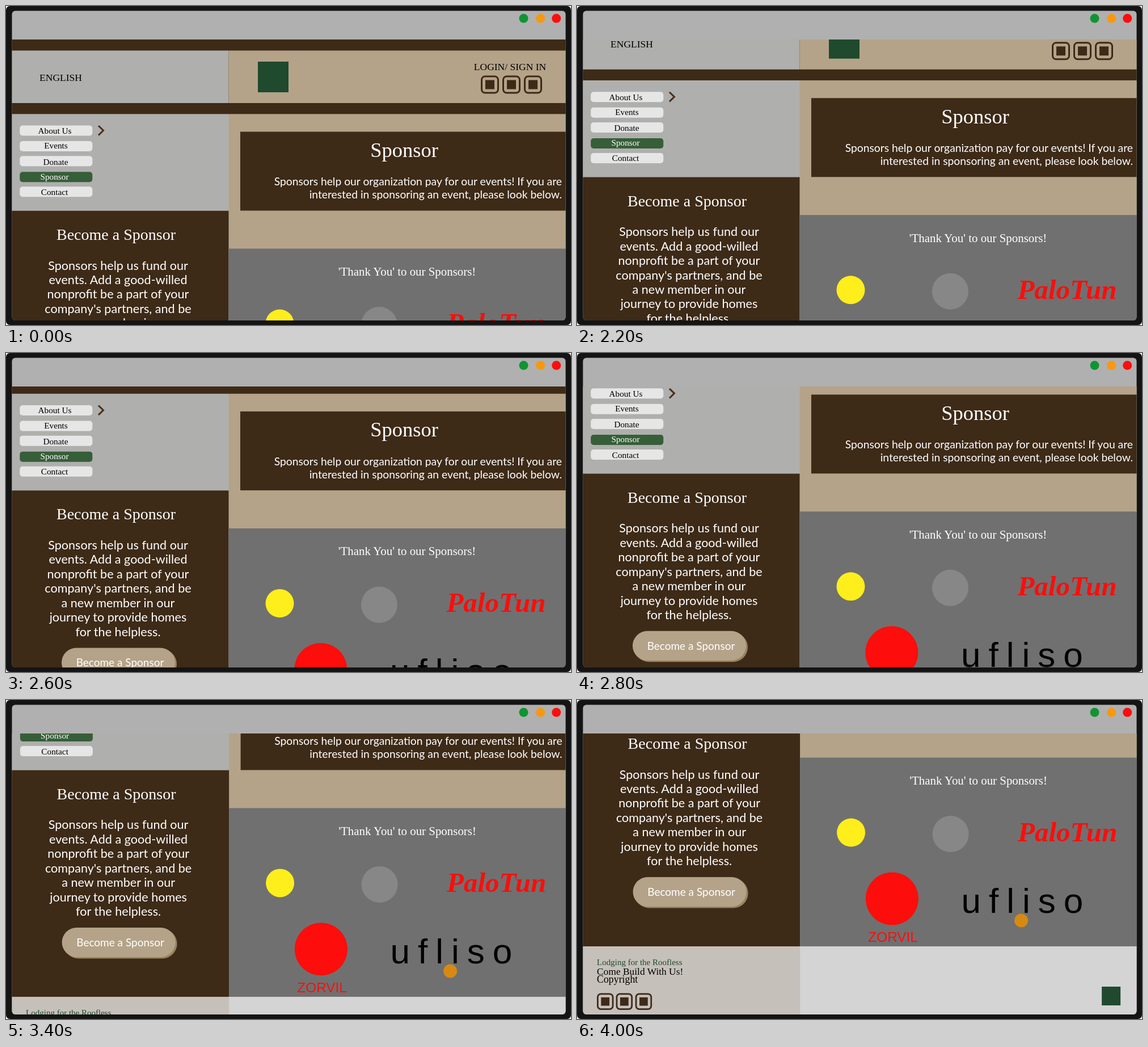
An HTML page that plays this animation: 996x562 px, repeating every 6 s.

```html
<!DOCTYPE html>
<html lang="en">
<head>
<meta charset="utf-8">
<title>Sponsor page</title>
<style>
  html, body { margin: 0; width: 100%; height: 100%; overflow: hidden; background: #fff; }
  svg { display: block; width: 996px; height: 562px; }
  text { font-family: "Liberation Serif", serif; }
  .body { font-family: Lato, sans-serif; fill: #fff; }
  .sans { font-family: "Liberation Sans", sans-serif; }
  .mid { text-anchor: middle; }
  .end { text-anchor: end; }
  .white { fill: #fff; }
  .brown { fill: #3d2a17; }
  .tan { fill: #b4a389; }
  .grey { fill: #afafad; }
  .green { fill: #1f4a2e; }
  .red { fill: #fd0d0b; }
</style>
</head>
<body>
<svg viewBox="0 0 996 562">
  <defs>
    <clipPath id="screen"><rect x="10.5" y="8.5" width="976" height="545.5" rx="6"/></clipPath>
    <clipPath id="view"><rect y="59" width="996" height="503"/></clipPath>
    <g id="social">
      <rect x="1.5" y="1.5" width="29" height="29" rx="6" fill="none" stroke="#3d2a17" stroke-width="3"/>
      <rect x="8" y="8" width="16" height="16" class="brown"/>
    </g>
  </defs>

  <rect width="996" height="562" rx="7" fill="#141414"/>
  <g clip-path="url(#screen)">
    <rect width="996" height="562" fill="#b0b0b0"/>
    <g clip-path="url(#view)">
      <g id="page">
        <!-- header -->
        <rect y="59" width="996" height="132" class="brown"/>
        <rect y="78.5" width="392.5" height="92.5" class="grey"/>
        <rect x="392.5" y="78.5" width="604" height="92.5" class="tan"/>
        <text x="96.5" y="131.8" font-size="17.5" class="mid">ENGLISH</text>
        <rect x="444" y="98" width="54" height="54" class="green"/>
        <text x="888.5" y="113.3" font-size="17.5" class="mid">LOGIN/ SIGN IN</text>
        <use href="#social" x="837" y="122.5"/>
        <use href="#social" x="875" y="122.5"/>
        <use href="#social" x="913" y="122.5"/>

        <!-- menu -->
        <rect y="190.3" width="392.5" height="171" class="grey"/>
        <g id="menu" font-size="15.3" class="mid"></g>
        <path d="M163 211l8.5 8.3-8.5 8.4" fill="none" stroke="#4a2d1a" stroke-width="3"/>

        <!-- intro -->
        <rect x="392.5" y="190.3" width="604" height="238" class="tan"/>
        <rect x="413" y="221.5" width="584" height="139" class="brown"/>
        <text x="702" y="266" font-size="36.5" class="mid white">Sponsor</text>
        <g font-size="19.3">
          <text x="980" y="316.3" class="body end">Sponsors help our organization pay for our events! If you are</text>
          <text x="980" y="339.3" class="body end">interested in sponsoring an event, please look below.</text>
        </g>

        <!-- call to action -->
        <rect y="360.8" width="392.5" height="400" class="brown"/>
        <text x="194" y="412" font-size="28" class="mid white">Become a Sponsor</text>
        <g id="pitch" font-size="21.6" class="mid"></g>
        <rect x="101" y="640.5" width="200" height="52" rx="26" fill="#9b835f"/>
        <rect x="98" y="638" width="200" height="52" rx="26" class="tan"/>
        <text x="201" y="670.8" font-size="19" class="body mid">Become a Sponsor</text>

        <!-- sponsors -->
        <rect x="392.5" y="427.5" width="604" height="333" fill="#707070"/>
        <text x="707" y="475" font-size="20.9" class="mid white">'Thank You' to our Sponsors!</text>
        <ellipse cx="482.5" cy="559.5" rx="25" ry="25" fill="#fdee1c"/>
        <ellipse cx="658" cy="562" rx="32" ry="32" fill="#878787"/>
        <text x="864" y="575" font-size="49" font-weight="bold" font-style="italic" class="mid red">PaloTun</text>
        <ellipse cx="554.8" cy="676" rx="46.5" ry="46.5" class="red"/>
        <text x="556.5" y="752" font-size="24.4" class="sans mid red">ZORVIL</text>
        <text x="677" y="701" font-size="62" letter-spacing="14" class="sans">ufliso</text>
        <ellipse cx="782.5" cy="714.5" rx="12" ry="12" fill="#d68a14"/>

        <!-- footer -->
        <rect y="760" width="392.5" height="140" fill="#c6c0ba"/>
        <rect x="392.5" y="760" width="604" height="140" fill="#d4d4d4"/>
        <text x="34.5" y="793" font-size="15" class="green">Lodging for the Roofless</text>
        <text x="34.5" y="810" font-size="17.4">Come Build With Us!</text>
        <text x="34.5" y="824.3" font-size="17.8">Copyright</text>
        <g transform="translate(34.5 842.5) scale(.92)">
          <use href="#social"/>
          <use href="#social" x="36.5"/>
          <use href="#social" x="73.5"/>
        </g>
        <rect x="924.5" y="831" width="33" height="33" class="green"/>
      </g>
    </g>
    <ellipse cx="912.5" cy="21.8" rx="8" ry="8" fill="#109433"/>
    <ellipse cx="942.2" cy="21.8" rx="8" ry="8" fill="#f7990f"/>
    <ellipse cx="970.2" cy="21.8" rx="8" ry="8" fill="#fc0d0d"/>
  </g>
</svg>
<script>
  const byId = id => document.getElementById(id);

  // label, button top, text centre, baseline
  const menu = [
    ["About Us", 210.5, 86, 225],
    ["Events", 238, 88, 251.3],
    ["Donate", 264.2, 87.5, 279.5],
    ["Sponsor", 292.2, 85.5, 305.5],
    ["Contact", 318.2, 85.5, 332.7],
  ];
  byId("menu").innerHTML = menu.map(([label, top, x, y]) => {
    const active = label === "Sponsor";
    return `<rect x="24.3" y="${top}" width="128" height="18" rx="5" fill="${active ? "#365e38" : "#e6e6e6"}"/>
      <text x="${x}" y="${y}" fill="${active ? "#fff" : "#000"}">${label}</text>`;
  }).join("");

  const pitch = [
    "Sponsors help us fund our",
    "events. Add a good-willed",
    "nonprofit be a part of your",
    "company's partners, and be",
    "a new member in our",
    "journey to provide homes",
    "for the helpless.",
  ];
  byId("pitch").innerHTML = pitch.map((line, i) =>
    `<text x="197.5" y="${464.5 + 25.45 * i}" class="body">${line}</text>`).join("");

  const LOOP = 6000, START = 2000, STEP = 200, STEPS = 11, DISTANCE = 326;
  const page = byId("page");

  function draw() {
    const time = performance.now() % LOOP;
    const step = Math.max(0, Math.min(STEPS, Math.floor((time - START) / STEP) + 1));
    const drift = step > 6 ? 0.6 : 0;
    page.setAttribute("transform", `translate(${drift} ${-DISTANCE * step / STEPS})`);
    requestAnimationFrame(draw);
  }
  draw();
</script>
</body>
</html>
```
